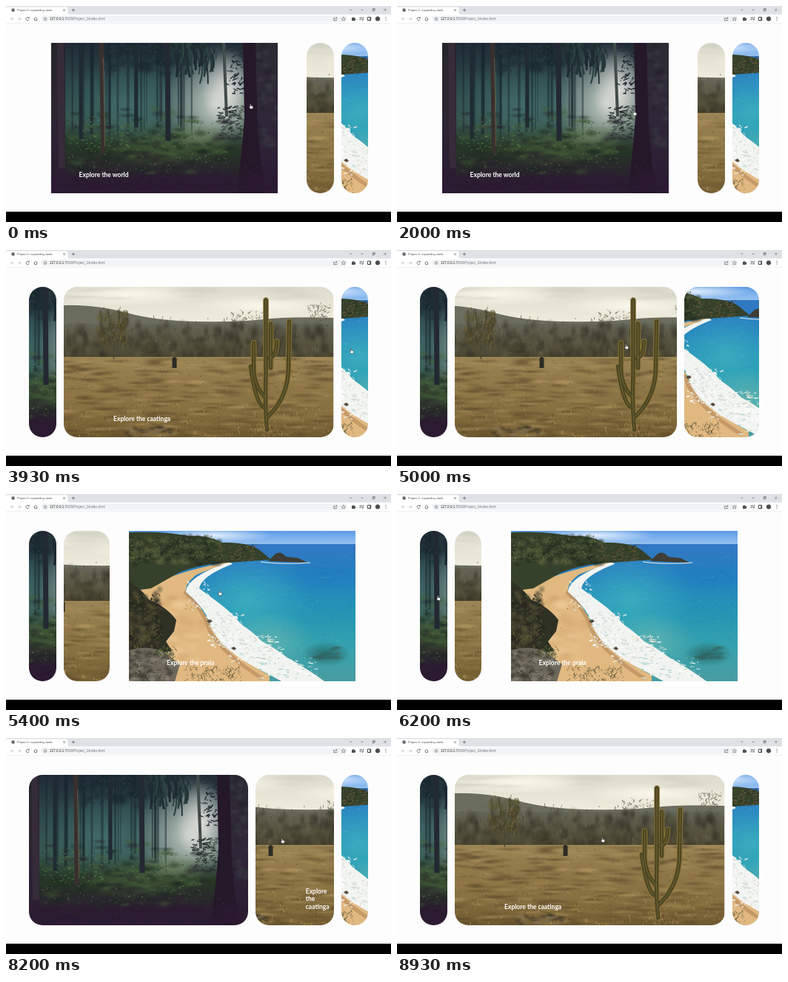
Animation of 520 by 293 pixels, one loop 8.99 s. Source, as an HTML page with a canvas:

```html
<!DOCTYPE html>
<html lang="en">
<head>
<meta charset="utf-8">
<title>Expanding cards</title>
<style>
html, body { margin: 0; width: 100%; height: 100%; overflow: hidden; background: #fefdfe; }
#stage { position: absolute; left: 0; top: 0; width: 520px; height: 293px; overflow: hidden; }
#chrome, #hand { position: absolute; left: 0; top: 0; }
#chrome text { font-family: "Liberation Sans", Arial, sans-serif; }
#cards { position: absolute; left: 31px; top: 50px; width: 458px; height: 204px; display: flex; gap: 10px; }
.card { position: relative; flex: 1 1 0; min-width: 0; overflow: hidden; border-radius: 18.2px; }
.card canvas { position: absolute; left: 50%; top: 0; height: 204px; transform: translateX(-50%); }
.card h3 { position: absolute; left: 67.6px; right: 0; bottom: 19.6px; margin: 0; color: #fff;
  font: 700 8.5px/10.5px Lato, sans-serif; }
</style>
</head>
<body>
<div id="stage">
  <svg id="chrome" width="520" height="293" fill="none" stroke="#5f6368" stroke-width=".8">
    <g stroke="none">
      <path fill="#dee1e6" d="M0 0H520V12H0Z"/>
      <path fill="#fff" d="M0 12V2.5Q0 1.5 2 1.5H81Q83.5 1.5 83.5 4V9.5Q83.5 11.5 86 11.5H520V23.5H0Z"/>
      <path fill="#e4e5e8" d="M0 23.3H520V23.8H0Z"/>
      <rect x="47" y="13" width="414" height="9" rx="4.5" fill="#f1f3f4"/>
      <path fill="#000" d="M0 279H520V293H0Z"/>
      <circle cx="9.6" cy="5.6" r="2.3" fill="#4d5156"/>
      <text x="15" y="7.1" font-size="4" fill="#45494d">Projeto 1: expanding cards</text>
      <text x="59" y="19.2" font-size="4.66" fill="#202124">127.0.0.1<tspan fill="#73777c">:5500/Project_1/index.html</tspan></text>
      <circle cx="502" cy="17.3" r="3.1" fill="#4b4a50"/>
      <g fill="#4d5156">
        <circle cx="513" cy="15.4" r=".55"/><circle cx="513" cy="17.3" r=".55"/><circle cx="513" cy="19.2" r=".55"/>
        <path d="M467 16h1.2a.9.9 0 0 1 1.8 0H471.500V17.300a.9.9 0 0 1 0 1.800V20H467Z"/>
      </g>
    </g>
    <path stroke="#dfe8e4" stroke-width=".6" d="M8 5.2Q9.600 6 9 7.400M10.200 3.800Q10 5.200 11.500 5.500"/>
    <path d="M77.200 4.300l2.600 2.600m0-2.600l-2.600 2.600M91 3.600v4m-2-2h4"/>
    <path stroke="#bfc1c4" d="M10.500 17.500H6.200m2-2l-2 2 2 2M15.800 17.500H20.100m-2-2l2 2-2 2"/>
    <path d="M31 16.300A2.100 2.100 0 1 0 31.200 18.200M31.300 14.800V16.500H29.600M37.700 17.500L40 15.300L42.300 17.500M38.400 17V19.600H41.600V17"/>
    <circle cx="53" cy="17.500" r="1.900" stroke-width=".6"/>
    <path stroke-width=".6" d="M53 17.300V18.600M53 16.200V16.700"/>
    <path stroke-width=".7" d="M444 16H442.700V19.700H446.700V18.500M444.200 18Q444.500 16.200 447 16.200M445.900 14.900L447.200 16.200L445.900 17.500"/>
    <path stroke-width=".6" d="M455.700 14.900l.8 1.700 1.800.2-1.300 1.200.4 1.800-1.700-.9-1.700.9.400-1.800-1.300-1.200 1.800-.2Z"/>
    <path d="M477.500 15.600h3.500M477.500 17.200h3.500M477.500 18.800h2M482.200 19V15.200h1.300"/>
    <circle cx="481.500" cy="19" r=".6"/>
    <path stroke="#3c4043" d="M488.300 15.200h4.400v4.300h-4.400ZM491.800 15.200V19.500" stroke-width="1"/>
    <path stroke="#55585c" stroke-width=".6" d="M464.200 4.500l1.600 1.500 1.600-1.500M479.500 5.300h3.300M495 4.400h2.400v2.400H495ZM495.800 4.400V3.600H498.200V6H497.400M510.300 3.800l3 3m0-3l-3 3"/>
  </svg>
  <div id="cards"></div>
  <svg id="hand" width="8" height="9" viewBox="0 0 8 9">
    <path fill="#fff" stroke="#222" stroke-width=".5" d="M2.500 5V1.200Q3.100.5 3.700 1.200V3.300L6 3.700Q6.800 4 6.700 5L6.200 7.500H3.300L1.200 5.200Q1.500 4.400 2.500 5Z"/>
  </svg>
</div>
<script>
const LOOP = 8990, SLIDE = 700;
let ctx, seed;

const rnd = (a = 0, b = 1) => {
  seed = (seed * 16807) % 2147483647;
  return a + (b - a) * seed / 2147483647;
};
const pick = list => list[Math.floor(rnd(0, list.length))];
const fill = (color, d) => { ctx.fillStyle = color; ctx.fill(new Path2D(d)); };
const line = (color, width, d) => {
  ctx.strokeStyle = color;
  ctx.lineWidth = width;
  ctx.stroke(new Path2D(d));
};
function wash(x, y, w, h, ...colors) {
  const g = ctx.createLinearGradient(0, y, 0, y + h);
  colors.forEach((c, i) => g.addColorStop(i / (colors.length - 1), c));
  ctx.fillStyle = g;
  ctx.fillRect(x, y, w, h);
}
// Soft elliptical patch; rgb is "r,g,b".
function glow(x, y, rx, ry, rgb, alpha) {
  const g = ctx.createRadialGradient(0, 0, 0, 0, 0, 1);
  g.addColorStop(0, `rgba(${rgb},${alpha})`);
  g.addColorStop(1, `rgba(${rgb},0)`);
  ctx.save();
  ctx.translate(x, y);
  ctx.scale(rx, ry);
  ctx.fillStyle = g;
  ctx.fillRect(-1, -1, 2, 2);
  ctx.restore();
}
// Random soft patches inside a box.
function mottle(n, x, y, w, h, colors, rx, ry, alpha) {
  for (let i = 0; i < n; i++) {
    glow(x + rnd(0, w), y + rnd(0, h), rx * rnd(.5, 1), ry * rnd(.5, 1), pick(colors), alpha);
  }
}
// Short random strokes inside a box.
function strokes(n, x, y, w, h, colors, width, dx, dy) {
  for (let i = 0; i < n; i++) {
    const px = x + rnd(0, w), py = y + rnd(0, h);
    line(pick(colors), rnd(.4, 1) * width, `M${px} ${py}l${rnd(-dx, dx)} ${rnd(-dy, dy)}`);
  }
}

function forest() {
  wash(0, 0, 306, 204, '#212b37', '#2c4649', '#36544e', '#2a3d31', '#291d2c');
  glow(110, 85, 100, 65, '74,122,122', .65);
  glow(222, 82, 74, 82, '205,212,204', .95);
  glow(238, 65, 34, 54, '238,234,230', .8);
  for (let i = 0; i < 24; i++) {
    const x = rnd(15, 190);
    line('rgba(25,37,45,.5)', rnd(1, 4), `M${x} 0V${rnd(105, 135)}`);
  }
  wash(0, 112, 306, 92, 'rgba(38,58,44,0)', 'rgba(38,54,36,.95)', '#2a262d', '#2c1a32');
  glow(155, 140, 95, 30, '88,114,68', .55);
  glow(200, 125, 45, 20, '125,145,108', .6);
  mottle(120, 15, 90, 235, 90, ['26,38,32', '68,94,54', '36,32,40'], 16, 6, .55);
  strokes(420, 20, 105, 220, 72, ['#3d5a37', '#536f42', '#26392c', '#20292a', '#667f50'], 1, 3, 2);
  strokes(90, 20, 100, 85, 45, ['#4a6d48', '#5f8655'], 1.1, 4, 1.5);
  mottle(45, 75, 0, 85, 42, ['24,38,44'], 13, 9, .55);
  strokes(160, 70, 0, 85, 40, ['#1d2c33', '#263b3d'], 1.2, 6, 5);
  line('#38302f', 6, 'M68 0L70 150');
  line('#655a42', 1, 'M70.500 20L72.500 140');
  line('#232932', 7, 'M157 0L158 133');
  line('#424c4a', 4, 'M233 0L237 100');
  line('#202a32', 5, 'M115 0V115M40 0V130');
  // Drooping spruce branches
  for (let i = 0; i < 56; i++) {
    const x = rnd(160, 218), y = rnd(-12, 18), l = rnd(15, 55) * (1 - Math.abs(x - 195) / 60);
    line(pick(['#1f2b32', '#253638', '#2c4141']), rnd(1, 3), `M${x} ${y}q${rnd(-2, 10)} ${l / 2} ${rnd(-2, 7)} ${l}`);
  }
  strokes(170, 228, 85, 40, 46, ['#24292e', '#2e3736', '#3e4a40'], 1.6, 7, 2);
  strokes(80, 240, 0, 30, 70, ['#283138', '#252831'], 2, 7, 5);
  wash(274, 0, 32, 204, '#2c2c35', '#302738', '#2b1b33');
  mottle(40, 280, 0, 26, 150, ['62,68,72', '32,30,42'], 9, 7, .5);
  fill('#251829', 'M259 0H276L279 120L288 204H250Q258 150 261 100Z');
  mottle(70, 0, 180, 306, 24, ['44,26,50'], 30, 14, .6);
  strokes(110, 0, 160, 306, 30, ['#2e3b2e', '#2c1f32', '#35293a'], 1.2, 5, 3);
  wash(0, 0, 19, 204, '#26252c', '#2d2533', '#2c1b33');
  fill('#362b38', 'M8 0H17L19 170H10Z');
}

function desert() {
  wash(0, 0, 365, 100, '#dcdccd', '#f0eddd', '#e5e2d0');
  glow(90, 10, 100, 16, '252,250,238', .9);
  glow(270, 25, 90, 14, '252,250,238', .9);
  mottle(14, 0, 0, 365, 16, ['205,206,194'], 50, 5, .5);
  fill('#6b6d5f', 'M0 25Q45 24 85 35T180 47T270 44T365 42V100H0Z');
  wash(0, 50, 365, 50, 'rgba(80,79,63,.2)', '#56533e', '#4a442e');
  mottle(190, 0, 52, 365, 44, ['58,57,43', '100,97,76', '46,44,32'], 9, 13, .5);
  strokes(300, 0, 44, 365, 50, ['#504f40', '#605d4a', '#403f30', '#736c54'], .8, 2, 7);
  wash(0, 95, 365, 109, '#9c8555', '#8f7849', '#866f40', '#705a30');
  mottle(330, 0, 97, 365, 107, ['176,151,96', '84,66,37', '104,84,48', '150,124,72'], 26, 4, .5);
  strokes(900, 0, 96, 365, 106, ['#b49a62', '#6d5831', '#836c3f', '#58492a', '#a58b56'], .7, 3, 1.5);
  strokes(260, 0, 160, 365, 44, ['#bca267', '#594925', '#7c683c'], .7, 1.5, 5);
  // Dry tree and bushes
  mottle(35, 48, 36, 38, 42, ['70,65,38'], 8, 10, .5);
  line('#4b4530', 1.5, 'M68 98V58M68 80Q53 69 49 45M68 78Q83 67 87 42M68 69Q62 50 60 31M68 68Q76 52 75 32');
  strokes(230, 45, 32, 43, 46, ['#5f5732', '#70653b', '#49462d'], 1.3, 2, 6);
  strokes(60, 330, 24, 30, 18, ['#6f7360', '#858773'], 1, 4, 4);
  strokes(50, 225, 33, 42, 15, ['#676957', '#808170'], 1, 4, 4);
  fill('#2d2b24', 'M147 97Q150 93 153 97V110H147Z');
  mottle(26, 85, 190, 60, 13, ['66,58,42', '128,112,82'], 10, 4, .8);
  // Cactus: lit edge, dark body and a ridge
  const arms = 'M275 194Q272 160 273.500 120V18M274 178Q305 150 304 105L305 47'
    + 'M273 150Q258 136 257 112V76M270 163Q260 158 253 108M277 97Q288 95 288 74M280 110V50';
  ctx.lineCap = 'round';
  line('#8d7539', 7.6, arms);
  line('#4d4623', 5.6, arms);
  line('#6f6432', 1, arms);
  ctx.lineCap = 'butt';
  strokes(90, 253, 186, 48, 18, ['#a3894f', '#574625'], .8, 2, 6);
}

function beach() {
  wash(0, 0, 306, 19, '#5b9ae4', '#7db2ee', '#98c2ee');
  glow(115, 6, 80, 10, '240,246,255', .9);
  wash(0, 18, 306, 186, '#3377c4', '#2484bf', '#2496b5', '#36a2ae', '#4a9da2');
  glow(160, 92, 85, 62, '72,190,194', .6);
  glow(270, 60, 70, 28, '30,120,186', .5);
  glow(190, 150, 60, 40, '120,190,178', .6);
  strokes(260, 130, 30, 176, 140, ['rgba(20,95,145,.2)', 'rgba(150,215,215,.2)'], 1, 5, .4);
  glow(266, 167, 34, 17, '37,92,89', .8);
  mottle(16, 248, 158, 40, 18, ['50,92,84'], 9, 4, .6);
  fill('#e0b880', 'M0 70L27 76Q66 54 136 42L92 59Q72 74 78 86Q104 108 112 133Q130 164 190 196V204H0Z');
  mottle(40, 45, 70, 55, 120, ['238,203,152', '208,164,108'], 18, 10, .5);
  line('rgba(190,146,98,.8)', 5, 'M75 82Q101 108 109 135Q127 167 180 200');
  fill('#f2f4f1', 'M136 42Q78 62 77 83Q106 107 112 133Q128 165 184 192L206 204H264Q235 183 214 172Q196 158 180 150Q166 136 152 127Q138 110 123 99L95 78Q98 61 140 45Z');
  strokes(160, 108, 112, 45, 45, ['#fff', '#d3dedd', '#e6e9e4'], 1.8, 5, 3);
  strokes(130, 130, 140, 75, 40, ['#fff', '#c2d8d6', '#ddd7c7'], 1.4, 6, 2);
  strokes(70, 175, 172, 80, 30, ['#fff', '#a9d0ca'], 1.3, 7, 1);
  strokes(50, 80, 70, 30, 38, ['#fff', '#d4e5e4'], 1.4, 4, 3);
  // Headland, offshore rocks and cliffs
  fill('#36412b', 'M0 2Q45 0 81 7Q105 5 126 16Q165 15 180 29L192 39L136 43Q95 45 67 57L30 78L0 82Z');
  mottle(130, 0, 6, 122, 40, ['84,98,56', '30,40,28', '100,104,66', '28,34,27'], 9, 6, .6);
  strokes(370, 2, 8, 115, 34, ['#505f36', '#2a3424', '#61683e', '#232b22'], 1.2, 3, 2.5);
  strokes(140, 118, 19, 55, 21, ['#485434', '#29301f', '#68583c'], 1.5, 4, 2);
  fill('#3f3d34', 'M188 41L197 32Q205 26 212 35L229 37L241 43Z');
  line('#e8f0ef', 1, 'M178 42Q208 46 245 43');
  fill('#2f3124', 'M0 68Q18 80 27 93Q52 104 64 121L61 136L50 150L58 163L0 174Z');
  mottle(70, 0, 78, 42, 82, ['78,80,50', '28,27,24', '96,86,58'], 9, 7, .6);
  strokes(170, 0, 85, 42, 73, ['#49502e', '#24231e', '#5d5438'], 1.5, 4, 4);
  fill('#6e685c', 'M0 162Q28 154 48 165L69 181L62 204H0Z');
  mottle(55, 0, 163, 58, 40, ['150,142,128', '64,60,54', '48,48,40'], 9, 6, .6);
  strokes(80, 0, 163, 58, 40, ['#8a8273', '#48443c', '#34352d'], 1.4, 6, 4);
  strokes(50, 36, 157, 28, 14, ['#617038', '#3b4d27'], 1.4, 3, 4);
  strokes(110, 76, 184, 75, 20, ['#5d5439', '#8b7750', '#454a2e'], .9, 5, 6);
  fill('#54483b', 'M138 159l4-2 3 3-3 2ZM105 122l5-2 3 3-5 2Z');
  strokes(9, 67, 77, 30, 55, ['#6d4937'], 1, 1, 1);
}

const deck = [['Explore the world', 306, forest], ['Explore the caatinga', 365, desert], ['Explore the praia', 306, beach]];
const cards = deck.map(([title, width, paint], i) => {
  const card = document.createElement('div'), picture = document.createElement('canvas');
  const heading = document.createElement('h3');
  card.className = 'card';
  heading.textContent = title;
  picture.width = width * 2;
  picture.height = 408;
  ctx = picture.getContext('2d');
  ctx.scale(2, 2);
  seed = 71 + i * 1009;
  paint();
  card.append(picture, heading);
  document.getElementById('cards').append(card);
  return { card, heading };
});

// [time, card] of each click, and [time, x, y] of the pointer
const clicks = [[-SLIDE, 0], [2884, 1], [4734, 2], [6215, 0], [7925, 1]];
const track = [[0, 331, 136], [800, 331, 136], [1400, 181, 206], [1670, 181, 206], [2000, 321, 145],
  [2450, 424, 139], [2900, 424, 139], [3200, 466, 136], [4740, 468, 138], [5000, 310, 131], [5350, 292, 134],
  [6130, 56, 141], [6300, 56, 141], [6930, 386, 140], [7500, 424, 140], [7940, 424, 140], [8600, 278, 138], [LOOP, 278, 138]];
const hand = document.getElementById('hand');

// cubic-bezier(.42, 0, 1, 1)
function easeIn(x) {
  let lo = 0, hi = 1;
  for (let i = 0; i < 24; i++) {
    const s = (lo + hi) / 2, r = 1 - s;
    if (1.26 * r * r * s + 3 * r * s * s + s * s * s < x) lo = s; else hi = s;
  }
  return lo * lo * (3 - 2 * lo);
}

function draw(t) {
  const n = clicks.filter(c => c[0] <= t).length - 1;
  const [start, active] = clicks[n], last = n ? clicks[n - 1][1] : active;
  const p = n ? easeIn(Math.min(1, (t - start) / SLIDE)) : 1;
  cards.forEach(({ card, heading }, i) => {
    const share = i === active ? p : i === last ? 1 - p : 0;
    card.style.flexGrow = 1 + 9 * share;
    heading.style.visibility = i === active ? 'visible' : 'hidden';
  });
  const k = track.findIndex(c => c[0] > t), [t0, x0, y0] = track[k - 1], [t1, x1, y1] = track[k];
  const u = (t - t0) / (t1 - t0), m = u * u * (3 - 2 * u);
  hand.style.transform = `translate(${x0 + (x1 - x0) * m - 4}px, ${y0 + (y1 - y0) * m - 4}px)`;
}

const begin = performance.now();
function tick() {
  draw((performance.now() - begin) % LOOP);
  requestAnimationFrame(tick);
}
tick();
</script>
</body>
</html>
```
